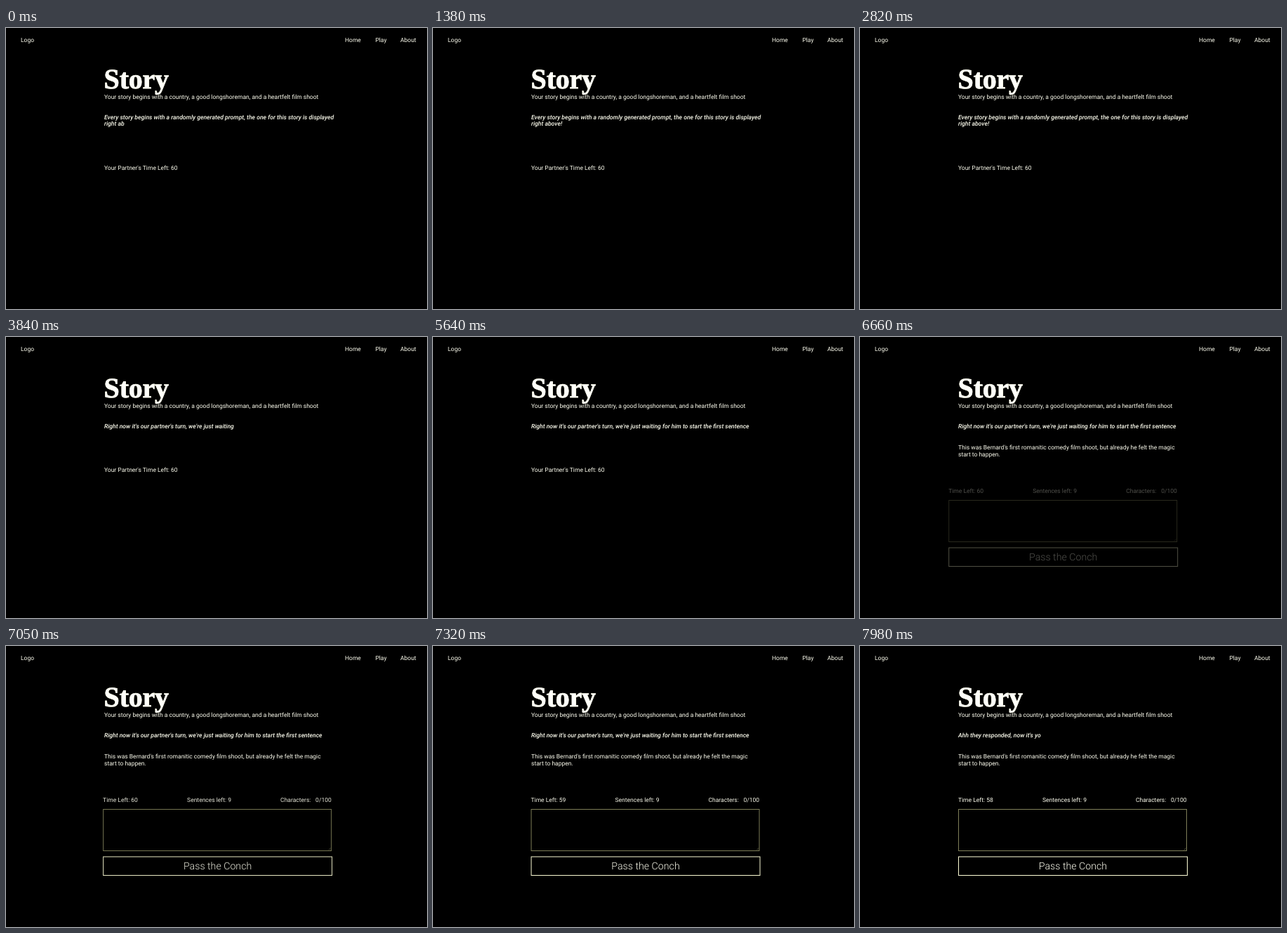
An HTML page that plays this animation: 600 by 400 pixels, repeating every 8 s.

```html
<!DOCTYPE html>
<html lang="en">
<head>
<meta charset="utf-8">
<title>Story</title>
<style>
html, body { margin: 0; width: 100%; height: 100%; overflow: hidden; background: #000; }
svg { display: block; width: 600px; height: 400px; background: #000; }
text {
  font: 400 8.5px Roboto, sans-serif;
  fill: #fffff0;
  text-rendering: geometricPrecision;
  white-space: pre;
}
.title {
  font: 700 40px "Liberation Serif", serif;
  letter-spacing: -.2px;
  fill: #fffffa;
  stroke: #fffff0;
  stroke-width: .9;
}
.hint { font-size: 8.63px; font-weight: 500; font-style: italic; }
.button { font-size: 14.2px; font-weight: 300; text-anchor: middle; }
.box { fill: none; stroke: #ffffd8; }
.area { stroke: #80805a; }
</style>
</head>
<body>
<svg viewBox="0 0 600 400">
  <text x="21" y="19.7">Logo</text>
  <text x="483" y="19.7">Home</text>
  <text x="526.4" y="19.7">Play</text>
  <text x="562" y="19.7">About</text>

  <text class="title" x="139.6" y="86.3">Story</text>
  <text x="140" y="101.4">Your story begins with a country, a good longshoreman, and a heartfelt film shoot</text>
  <text class="hint" id="hint1" x="140" y="129.8"></text>
  <text class="hint" id="hint2" x="140" y="139.3"></text>

  <text id="partner" x="140" y="201.6">Your Partner's Time Left: 60</text>

  <g id="story">
    <text x="140" y="160.3">This was Bernard's first romanitic comedy film shoot, but already he felt the magic</text>
    <text x="140" y="170">start to happen.</text>
  </g>

  <g id="form">
    <text id="timer" x="140" y="221.8"></text>
    <text x="260" y="221.8">Sentences left: 9</text>
    <text x="393" y="221.8">Characters:</text>
    <text x="443" y="221.8">0/100</text>
    <rect class="box area" x="140.5" y="232.5" width="325" height="59"/>
    <path class="box area" d="M461.5 290.5l3-3M463.5 290.5l1-1" stroke-width=".6"/>
    <rect class="box" x="140.5" y="300" width="326" height="26.5"/>
    <text class="button" x="303.5" y="318.3">Pass the Conch</text>
  </g>
</svg>
<script>
const LOOP = 8000;
const CHAR = 16;        // ms per typed character
const REPLY = 6570;     // the partner's sentence arrives
const SECOND = 500;     // one countdown step
const $ = id => document.getElementById(id);

const hints = [
  { lines: ["Every story begins with a randomly generated prompt, the one for this story is displayed", "right above!"] },
  { lines: ["Right now it's our partner's turn, we're just waiting for him to start the first sentence"], start: 2984 },
  { lines: ["Ahh they responded, now it's your turn"], start: 7476 }
];
// The first hint is already typed as far as "right ab" when the loop begins
hints[0].start = -CHAR * (hints[0].lines[0].length + 8.5);

const show = (id, on) => $(id).setAttribute("display", on ? "inline" : "none");

function setText(id, value) {
  if ($(id).textContent !== value) $(id).textContent = value;
}

function draw(t) {
  const { lines: [first, second = ""], start } = hints.filter(h => t >= h.start).pop();
  const typed = Math.max(1, Math.floor((t - start) / CHAR));
  const rest = second.slice(0, Math.max(0, typed - first.length));
  setText("hint1", first.slice(0, typed));
  setText("hint2", rest);
  $("partner").setAttribute("y", rest ? 201.6 : 192.1);

  const age = t - REPLY;
  const replied = age >= 0;
  show("partner", !replied);
  show("story", replied);
  show("form", replied);
  if (!replied) return;

  // Overdamped spring: the form slides in and fades up together
  const left = 1.1 * Math.exp(-age / 196) - 0.1 * Math.exp(-age / 18);
  $("form").setAttribute("transform", `translate(${(-20 * left).toFixed(2)} 0)`);
  $("form").setAttribute("opacity", (1 - left).toFixed(3));
  setText("timer", "Time Left: " + (60 - Math.floor(age / SECOND)));
}

const begin = performance.now();
function tick() {
  draw((performance.now() - begin) % LOOP);
  requestAnimationFrame(tick);
}
tick();
</script>
</body>
</html>
```
